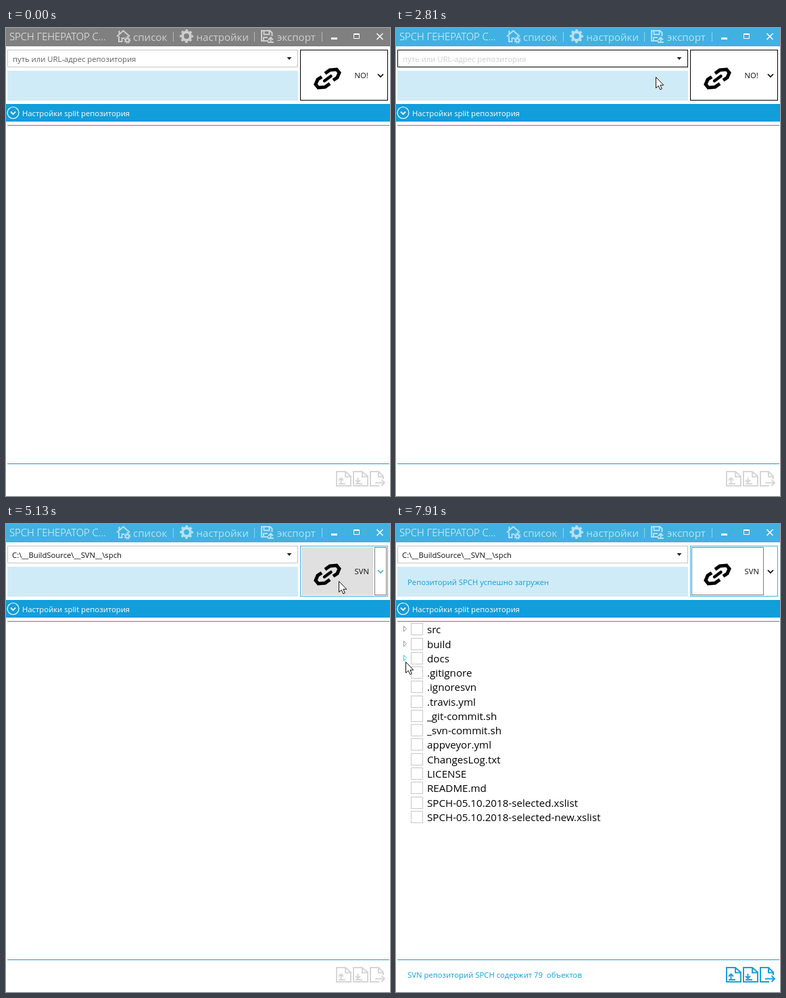
Recreate the animation shown at these times as an HTML page. Size 568 by 690 pixels, loop 8000 ms.

```html
<!DOCTYPE html>
<html lang="ru">
<head>
<meta charset="utf-8">
<title>SPCH</title>
<style>
html, body { margin: 0; width: 100%; height: 100%; overflow: hidden; background: #fff; }
svg { display: block; width: 568px; height: 690px; }
text { font: 11.3px "Open Sans", "Noto Sans", sans-serif; white-space: pre; fill: #111; }
.title { font-size: 14.9px; font-weight: 300; fill: #fff; }
.menu { font-size: 15.1px; fill: #fff; }
.tree text { font-size: 15.15px; fill: #000; }
.blue { fill: #119eda; }
.line { fill: none; }
</style>
</head>
<body>
<svg viewBox="0 0 568 690">
  <rect width="568" height="690" fill="#fff"/>
  <rect id="bar" width="568" height="27"/>
  <text class="title" x="5" y="18">SPCH ГЕНЕРАТОР С...</text>
  <g opacity=".62">
    <g class="line" stroke="#fff" stroke-width="2">
      <path d="M164 12.5L173.5 4l9.500 8.500M167.500 9V4M167 12v8h4.500v-5h4M180 12v2"/>
      <circle cx="179.500" cy="18" r="2.600"/>
      <circle cx="179.500" cy="18" r="4.200" stroke-width="1.500" stroke-dasharray="1.650"/>
      <circle cx="267" cy="12" r="5.900" stroke-width="4"/>
      <circle cx="267" cy="12" r="8.700" stroke-width="2.600" stroke-dasharray="3.417" stroke-dashoffset="1.700"/>
      <path d="M388 19h-10V4h12.500l3 3v5M381.500 4v5.500h8V4M381 19v-5h6M391.500 22v-7M388 17.500l3.500-3.500 3.500 3.500M387 21h9"/>
    </g>
    <g class="menu">
      <text class="menu" x="188" y="18.500">список</text>
      <text class="menu" x="281.500" y="18.500">настройки</text>
      <text class="menu" x="401" y="18.500">экспорт</text>
    </g>
    <path class="line" stroke="#fff" opacity=".7" d="M247.500 6v14M367.500 6v14M467.500 6v14"/>
  </g>
  <g class="line" stroke="#fff">
    <path stroke-width="3" d="M481 15.500h9"/>
    <path d="M514.500 8.500h8v7h-8zM514 9.500h9"/>
    <path stroke-width="1.500" d="M548.500 8l9 9M557.500 8l-9 9"/>
  </g>

  <rect id="combo" x="2.500" y="32.500" width="429" height="25" fill="#fff"/>
  <rect id="drop" x="407" y="33" width="24" height="24" fill="#aaa"/>
  <path fill="#222" d="M415.500 43h7l-3.500 4z"/>
  <rect id="selection" x="9" y="38" width="163" height="15" fill="#9dc3d4"/>
  <text id="hint" x="10" y="50">путь или URL-адрес репозитория</text>
  <text id="path" x="9" y="50">C:\__BuildSource\__SVN__\spch</text>

  <rect x="2" y="63" width="430" height="44" fill="#d0ebf8"/>
  <text id="message" class="blue" x="17" y="90"></text>

  <rect id="button" x="435.500" y="32.500" width="129" height="74" fill="#fff"/>
  <rect id="mainHover" x="437" y="34" width="106" height="71" fill="#e0e0e0"/>
  <rect id="sideHover" x="544" y="33" width="20" height="73" fill="#e0e0e0"/>
  <g class="line" stroke="#000" stroke-dasharray="1 1">
    <rect id="mainFocus" x="437.500" y="34.500" width="106" height="70"/>
    <rect id="sideFocus" x="545.500" y="34.500" width="17" height="70"/>
  </g>
  <g class="line" stroke="#000" stroke-width="5">
    <path id="link" d="M472 67L479 62L489 61L493 66L490 73L484 77"/>
    <path d="M472 67L479 62L489 61L493 66L490 73L484 77" transform="rotate(180 475.500 74.500)"/>
    <path stroke-width="4.500" stroke-linecap="round" d="M471 78L480.500 71"/>
  </g>
  <text id="kind" x="515.500" y="74"></text>
  <path id="chevron" class="line" stroke-width="1.700" d="M550 68l4 4 4-4"/>

  <rect y="112" width="568" height="26" fill="#119eda"/>
  <g class="line" stroke="#fff" stroke-width="1.200">
    <circle cx="10.500" cy="125" r="8.500"/>
    <path stroke-width="1.800" d="M7 123.500l3.500 3.500 3.500-3.500"/>
  </g>
  <text x="24" y="130" style="fill:#fff">Настройки split репозитория</text>
  <path class="line" stroke="#74787c" d="M2 143.500h565"/>
  <path class="line" stroke="#119eda" d="M2 642.500h565"/>

  <g id="tree" class="tree"></g>
  <text id="total" class="blue" x="17" y="669">SVN репозиторий SPCH содержит 79  объектов</text>
  <g id="tools" class="line" stroke-width="2">
    <path d="M489 654h13l8 7v14h-21zM502 654v7.500h8M495.500 671v-7M492 667l3.500-3.500 3.500 3.500M492 672h10"/>
    <path d="M514 654h13l8 7v14h-21zM527 654v7.500h8M520.500 663v7M517 666.500l3.500 3.500 3.500-3.500M517 672h10"/>
    <path d="M552 675h-13v-21h12l7 7v4M551 654v7.500h7M546 670.500h13M555.500 666l4.500 4.500-4.500 4.500"/>
  </g>

  <g id="popup">
    <rect x="435.500" y="107.500" width="129" height="101" fill="#fff" stroke="#41b1e1"/>
    <rect id="pick" x="436" y="108" width="128" height="25" fill="#a0d8f0"/>
    <rect x="436" y="183" width="128" height="25" fill="#71c5e8"/>
    <text x="441" y="125">SVN</text>
    <text x="441" y="150">GIT</text>
    <text x="441" y="175">HG</text>
    <text x="441" y="200" style="fill:#fff">NO!</text>
  </g>

  <g id="cursor">
    <path fill="#fff" stroke="#111" d="M.500.500V16.500L4.200 13.200L6.800 18.800L9.300 17.700L6.900 12.200H11.800Z"/>
    <circle id="halo" cx=".500" cy="1" r="12.500" fill="#dede50" opacity=".85"/>
  </g>
</svg>
<script>
const LOOP = 8000;
const $ = id => document.getElementById(id);
const show = (id, on) => $(id).setAttribute('visibility', on ? 'visible' : 'hidden');
const paint = (id, key, value) => $(id).setAttribute(key, value);
const within = (t, a, b) => t >= a && t < b;

const files = ['src', 'build', 'docs', '.gitignore', '.ignoresvn', '.travis.yml',
  '_git-commit.sh', '_svn-commit.sh', 'appveyor.yml', 'ChangesLog.txt', 'LICENSE',
  'README.md', 'SPCH-05.10.2018-selected.xslist', 'SPCH-05.10.2018-selected-new.xslist'];

$('tree').innerHTML = files.map((name, i) => {
  const y = Math.round(155.3 + 21.27 * i);
  const arrow = i < 3
    ? `<path id="node${i}" fill="#fff" stroke="#999" d="M11.500 ${y - 4.5}v8l4-4z"/>` : '';
  return `${arrow}<rect x="22.500" y="${y - 8.5}" width="17" height="17" fill="#fff" stroke="#c8c8c8"/>
    <text x="46" y="${y + 5.5}">${name}</text>`;
}).join('');

// Pointer moves: start, end, steps, from, bend, to
const moves = [
  [490, 580, 2, [498, 705], [443, 646], [388, 587]],
  [810, 1490, 10, [388, 587], [440, 300], [419, 43]],
  [2040, 2500, 7, [419, 43], [408, 60], [384, 72]],
  [3120, 3890, 11, [384, 72], [470, 129], [551, 86]],
  [4440, 4510, 2, [551, 86], [545, 104], [533, 117]],
  [4740, 5210, 7, [533, 117], [512, 104], [489, 81]],
  [6750, 7520, 11, [489, 81], [-40, 797], [68, 263]],
  [7600, 7910, 5, [68, 263], [36, 228], [14, 203]]
];
const clicks = [[1660, 1890], [4040, 4270], [4590, 4740], [5280, 5510]];

function pointer(t) {
  let at = moves[0][3];
  for (const [start, end, steps, from, bend, to] of moves) {
    if (t < start) break;
    const step = Math.floor((t - start) / (end - start) * (steps - 1) + .15) + 1;
    const p = Math.min(1, step / steps);
    const u = p * p * (3 - 2 * p), v = 1 - u;
    at = from.map((a, i) => Math.round(v * v * a + 2 * u * v * bend[i] + u * u * to[i]));
  }
  return at;
}

function draw(t) {
  const [x, y] = pointer(t);
  const open = within(t, 4110, 4740);
  const inRow = y >= 33 && y < 107 && !open;
  const overMain = inRow && x >= 436 && x < 544;
  const overSide = inRow && x >= 544;
  const overCombo = x < 432 && y >= 32 && y < 58;
  const typing = within(t, 1730, 4040);
  const loaded = t >= 5740;

  paint('bar', 'fill', t < 1660 ? '#808080' : '#41b1e1');
  paint('combo', 'stroke', typing ? '#000' : overCombo ? '#777' : '#c4c4c4');
  show('drop', overCombo);
  const fade = Math.max(0, Math.min(1, (t - 1890) / 450));
  const grey = Math.round(95 + 110 * fade);
  $('hint').style.fill = `rgb(${grey},${grey},${grey})`;
  show('hint', t < 2890);
  show('path', t >= 2890);
  show('selection', within(t, 2890, 4040));

  paint('button', 'stroke', within(t, 1660, 1730) || t >= 4040 ? '#41b1e1' : '#000');
  show('mainHover', overMain);
  show('sideHover', overSide);
  show('sideFocus', within(t, 4040, 5280));
  show('mainFocus', t >= 5280);
  paint('chevron', 'stroke', overMain || overSide || open ? '#41b1e1' : '#000');
  $('kind').textContent = t < 4740 ? 'NO!' : 'SVN';
  show('popup', open);
  show('pick', open && y >= 108);

  $('message').textContent = t < 5440 ? '' : t < 5820
    ? 'Загрузка репозитория: SPCH ..' : 'Репозиторий SPCH успешно загружен';
  $('tree').style.display = loaded ? '' : 'none';
  show('total', loaded);
  paint('tools', 'stroke', loaded ? '#1a9fdb' : '#d6d6d6');
  paint('node2', 'stroke', x < 20 && y >= 193 && y < 208 ? '#27c7f4' : '#999');

  $('cursor').style.display = t < 490 ? 'none' : '';
  paint('cursor', 'transform', `translate(${x} ${y})`);
  show('halo', clicks.some(([a, b]) => within(t, a, b)));
}

const began = performance.now();
function tick() {
  draw((performance.now() - began) % LOOP);
  requestAnimationFrame(tick);
}
draw(0);
requestAnimationFrame(tick);
</script>
</body>
</html>
```
